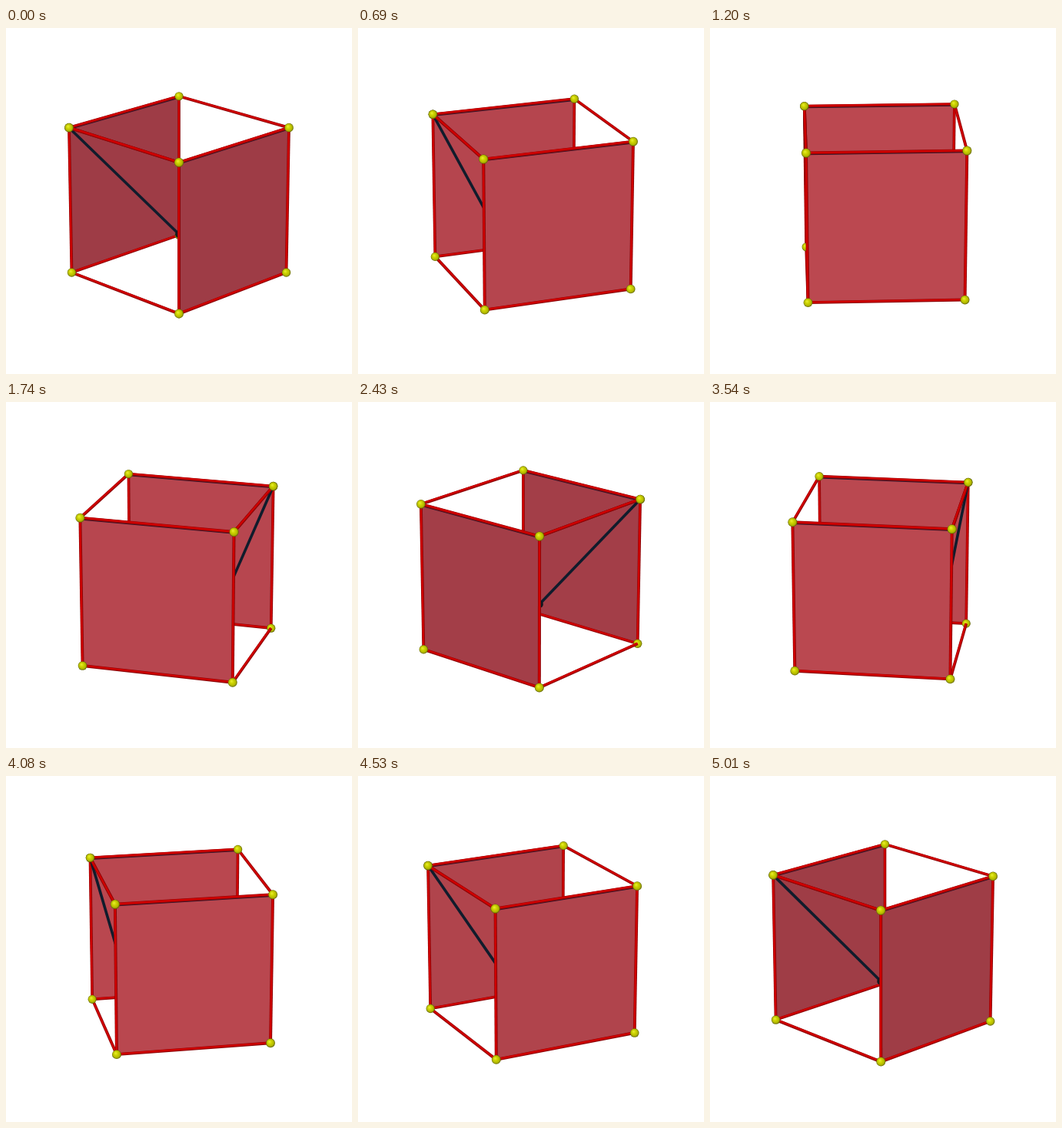
Animation, 450 px wide and 450 px high, one loop 5040 ms. Source, as an HTML page with a canvas:

```html
<!DOCTYPE html>
<html lang="en">
<head>
<meta charset="utf-8">
<title>Turning cube</title>
<style>
  html, body { margin: 0; width: 100%; height: 100%; overflow: hidden; background: #fff; }
  canvas { display: block; width: 450px; height: 450px; }
</style>
</head>
<body>
<canvas id="stage" width="450" height="450"></canvas>
<script>
const ctx = document.getElementById('stage').getContext('2d');
const STEP_MS = 30, STEPS = 168, TURN = 90 / 85;
const CENTER = 225, FOCAL = 2726, DISTANCE = 19.3;
const SIN_TILT = 1 / 3, COS_TILT = Math.sqrt(8) / 3;
const HALF = Math.SQRT1_2;
const rad = deg => deg * Math.PI / 180;
const mix = (a, b, t) => a + (b - a) * t;

// Corner on the unit circle: 0 faces the viewer, positive turns right.
function corner(deg, y) {
  const x = Math.sin(rad(deg)), z = Math.cos(rad(deg));
  const scale = FOCAL / (DISTANCE - z * COS_TILT - y * SIN_TILT);
  return {
    x: CENTER + x * scale,
    y: CENTER - (y * COS_TILT - z * SIN_TILT) * scale,
    r: scale * 0.041
  };
}

const pillar = deg => ({ top: corner(deg, HALF), low: corner(deg, -HALF) });

function stroke(a, b, color, width, dx = 0, dy = 0) {
  ctx.strokeStyle = color;
  ctx.lineWidth = width;
  ctx.beginPath();
  ctx.moveTo(a.x + dx, a.y + dy);
  ctx.lineTo(b.x + dx, b.y + dy);
  ctx.stroke();
}

function rod(a, b) {
  const w = (a.r + b.r) / 2 * 0.66;
  stroke(a, b, '#8c0508', w);
  stroke(a, b, '#d00000', w * 0.62, -0.2, -0.4);
}

function ball(p) {
  const { x, y, r } = p;
  const g = ctx.createRadialGradient(x - r * 0.25, y - r * 0.3, r * 0.1, x, y, r);
  g.addColorStop(0, '#e4ea28');
  g.addColorStop(0.35, '#cdd400');
  g.addColorStop(0.75, '#b0b600');
  g.addColorStop(1, '#5c6000');
  ctx.fillStyle = g;
  ctx.beginPath();
  ctx.arc(x, y, r, 0, 7);
  ctx.fill();
}

function wall(p, q, color) {
  ctx.fillStyle = color;
  ctx.beginPath();
  for (const c of [p.top, q.top, q.low, p.low]) ctx.lineTo(c.x, c.y);
  ctx.fill();
  stroke(p.top, q.top, '#2a1830', 2.4, 0, 1.5);
}

function frame(p, q) {
  rod(p.top, q.top);
  rod(p.low, q.low);
  rod(p.top, p.low);
  rod(q.top, q.low);
}

function balls(...pillars) {
  for (const p of pillars) { ball(p.low); ball(p.top); }
}

// Dark rod from a rear top corner to a point behind the nearest upright.
function darkRod(start, upright, deg) {
  const h = 0.475 - 0.0062 * deg;
  const end = {
    x: mix(upright.top.x, upright.low.x, h),
    y: mix(upright.top.y, upright.low.y, h)
  };
  stroke(start, end, '#101c2c', 3.6);
  const r = Math.min(5, (14 - deg) / 2);
  if (r > 0) {
    ctx.fillStyle = '#101820';
    ctx.beginPath();
    ctx.arc(end.x, end.y, r, 0, 7);
    ctx.fill();
  }
}

function draw(step) {
  const turn = (step <= STEPS / 2 ? step : STEPS - step) * TURN;
  const [front, right, back, left] = [0, 90, 180, 270].map(a => pillar(a - turn));
  const light = (Math.cos(rad(45 - turn)) - HALF) / (1 - HALF);
  const shade = [[158, 187], [60, 72], [70, 80]].map(([a, b]) => Math.round(mix(a, b, light)));
  const color = `rgb(${shade})`;

  ctx.fillStyle = '#fff';
  ctx.fillRect(0, 0, 450, 450);

  wall(left, back, color);
  frame(left, back);
  ball(back.low);
  if (turn < 45) darkRod(left.top, front, turn);
  else darkRod(back.top, right, 90 - turn);

  for (const [p, q] of [[left, front], [back, right]]) {
    rod(p.top, q.top);
    rod(p.low, q.low);
  }
  ball(left.low);
  ball(left.top);
  ball(back.top);

  wall(front, right, color);
  frame(front, right);
  // Near 0 and 90 degrees a side rod's top stays in front of the wall's end.
  rod(turn < 45 ? left.top : back.top, turn < 45 ? front.top : right.top);
  balls(front, right);
  ball(turn < 45 ? left.top : back.top);
}

function tick() {
  draw(Math.floor(performance.now() / STEP_MS) % STEPS);
  requestAnimationFrame(tick);
}
tick();
</script>
</body>
</html>
```
